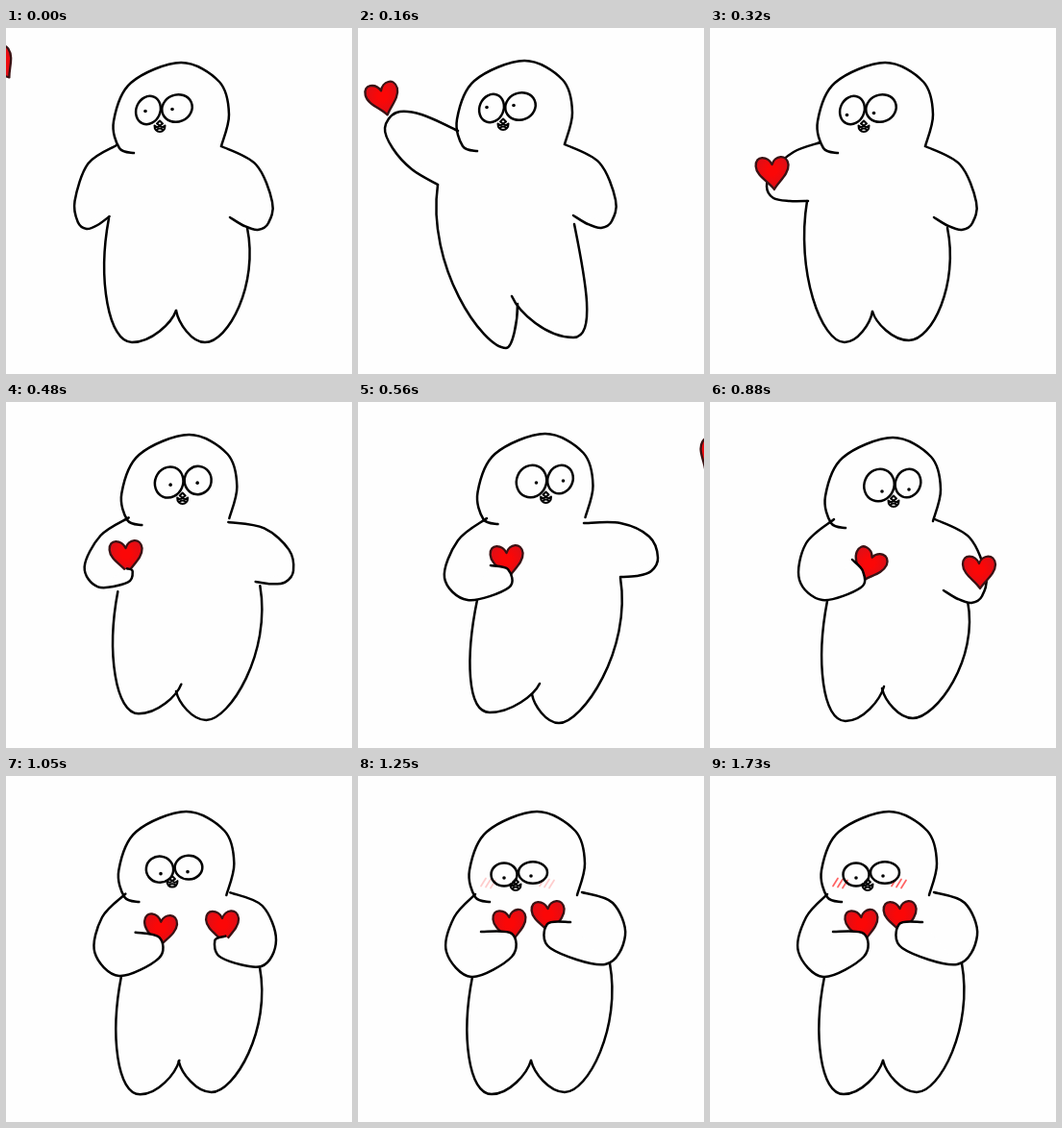
An HTML page with a canvas that plays this animation: 360 px wide and 360 px high, repeating every 2310 ms.

```html
<!DOCTYPE html>
<html lang="en">
<head>
<meta charset="utf-8">
<title>Catching hearts</title>
<style>
html, body { margin: 0; width: 100%; height: 100%; overflow: hidden; background: #fefefe; }
canvas { display: block; width: 100vw; height: 100vh; }
</style>
</head>
<body>
<canvas id="stage"></canvas>
<script>
const SIZE = 360, LOOP = 2310, PAPER = "#fefefe", INK = "#000";
const STEPS = [...Array(13).keys()].map(i => i * 80).concat(1050, 1250, 1450, 1730);
const CATCH_L = 6, CATCH_R = 13, STILL = 14; // steps where a heart slips behind the hand, and where all rests
const canvas = document.getElementById("stage");
const ctx = canvas.getContext("2d");

const mix = (a, b, f) => a.map((v, i) => v + (b[i] - v) * f);
const place = (pts, x, y, sx = 1) => pts.map((v, i) => i % 2 ? v + y : v * sx + x);
const flip = pts => place(pts, SIZE, 0, -1);

const HEAD = [133,130, 118,125, 112,97, 130,57, 182,36, 222,56, 232,90, 224,123];

// Arm curves from the shoulder, x pointing away from the body.
const ARM = {
  down: [0,0, 36,19, 53,58, 49,80, 38,87, 24,83, 9,74],
  carry: [0,0, 28,10, 50,30, 56,46, 49,58, 32,61, 13,61],
  out: [0,0, 38,0, 68,14, 77,36, 70,50, 55,55, 38,56],
  up: [0,0, 38,-17, 64,-19, 76,-3, 68,18, 48,40, 21,56],
  fold: [0,0, 30,23, 44,62, 20,85, -23,72, -22,53, -4,49],
  grip: [0,0, 29,25, 36,63, 12,84, -28,71, -30,54, -19,42],
  tuck: [0,0, 22,24, 30,60, 4,86, -38,65, -38,41, -6,39],
  hug: [0,0, 32,11, 45,45, 24,75, -33,58, -36,33, -12,31]
};

// head: dx, dy, turn, squint. leg: hip, foot, crotch. heart: x, y, angle.
const stand = {
  at: 0, head: [0,0, 0, 0], gaze: [-4,1],
  shoulderL: [115,122], armL: place(ARM.down, 0, 0, 0.82), legL: [107,198, 131,327, 177,294], heartL: [-7,38, -0.6],
  shoulderR: [224,123], armR: ARM.down, legR: [251,208, 207,327, 177,294], heartR: [470,57, 0.52]
};
const reachR = {
  at: 9, head: [26,-5, 1, 0], gaze: [2.5,0.5],
  shoulderL: [147,118], armL: ARM.fold, legL: [135,204, 136,322, 200,279], heartL: [167,166, -0.05],
  shoulderR: [256,107], armR: ARM.up, legR: [277,163, 206,333, 194,287], heartR: [334,74, 0.22]
};
const reachL = {
  ...stand, at: 2, head: [-9,-2, 0, 0], gaze: [-6,-1],
  shoulderL: flip(reachR.shoulderR), armL: ARM.up, legL: flip(reachR.legR), heartL: [26,74, -0.22],
  shoulderR: [215,121], legR: flip(reachR.legL)
};
const carryL = {
  ...stand, at: 4, gaze: [-6.5,5],
  shoulderL: [115,119], armL: ARM.carry, legL: [101,180, 140,327, 169,295], heartL: [65,151, -0.05],
  legR: [247,208, 207,325, 169,295]
};
const holdL = {
  at: 7, head: [12.5,-3, 1, 0], gaze: [4,1.5],
  shoulderL: [134,121], armL: ARM.fold, legL: [124,206, 137,323, 189,293], heartL: [155,166, -0.05],
  shoulderR: [235,126], armR: ARM.out, legR: [273,183, 209,334, 181,304], heartR: [369,57, 0.52]
};
const carryR = {
  at: 11, head: [8,1, 1, 0], gaze: [2,6.5],
  shoulderL: [129,122], armL: ARM.grip, legL: [122,207, 141,332, 181,296], heartL: [165,170, 0.42],
  shoulderR: [234,122], armR: ARM.down, legR: [268,207, 211,329, 179,298], heartR: [280,177, 0]
};
const hug = {
  at: STILL, head: [4,1, 0, 1], gaze: [-1,3.5],
  shoulderL: [122,123], armL: ARM.tuck, legL: [119,209, 139,331, 180,296], heartL: [158,156, -0.07],
  shoulderR: [233,121], armR: ARM.hug, legR: [262,195, 215,329, 180,296], heartR: [198,147, -0.05]
};
const poses = [stand, reachL, carryL, holdL, reachR, carryR, hug];

function poseAt(step) {
  const s = Math.min(step, STILL);
  const i = Math.min(poses.length - 2, poses.findLastIndex(p => p.at <= s));
  const a = poses[i], b = poses[i + 1], f = (s - a.at) / (b.at - a.at);
  const pose = {};
  for (const part in a) if (part !== "at") pose[part] = mix(a[part], b[part], f);
  return pose;
}

// Smooth curve through the points, starting at point number `from`.
function curve(pts, from = 0) {
  const last = pts.length / 2 - 1, path = new Path2D();
  const get = (i, k) => pts[2 * Math.max(0, Math.min(last, i)) + k];
  path.moveTo(get(from, 0), get(from, 1));
  for (let i = from; i < last; i++) {
    const lead = k => get(i, k) + (get(i + 1, k) - get(i - 1, k)) / 6;
    const trail = k => get(i + 1, k) - (get(i + 2, k) - get(i, k)) / 6;
    path.bezierCurveTo(lead(0), lead(1), trail(0), trail(1), get(i + 1, 0), get(i + 1, 1));
  }
  return path;
}

function leg([hx, hy, fx, fy, cx, cy], out) {
  ctx.beginPath();
  ctx.moveTo(hx, hy);
  ctx.bezierCurveTo(hx + out * 12, (hy + fy) / 2, fx + out * 24, fy, fx, fy);
  ctx.bezierCurveTo(fx + (cx - fx) * 0.4 - out * 2, fy, cx + (fx - cx) * 0.15 - out * 2, cy + (fy - cy) * 0.4, cx, cy);
  ctx.stroke();
}

function heart([x, y, angle]) {
  ctx.save();
  ctx.translate(x, y);
  ctx.rotate(angle);
  const shape = new Path2D("M0,-9C3,-18 16,-20 17,-8C17,2 6,9 1,17C-4,9 -17,2 -17,-8C-17,-20 -4,-18 0,-9Z");
  const red = ctx.createRadialGradient(0, -3, 5, 0, -3, 20);
  red.addColorStop(0, "#fb0707");
  red.addColorStop(1, "#d8101a");
  ctx.fillStyle = red;
  ctx.strokeStyle = "#3a1214";
  ctx.lineWidth = 2.3;
  ctx.fill(shape);
  ctx.stroke(shape);
  ctx.restore();
}

function arm(pts, [x, y], out, held, heartInFront) {
  const placed = place(pts, x, y, out);
  if (!heartInFront) heart(held);
  ctx.fillStyle = PAPER;
  ctx.fill(curve(placed, 3));
  ctx.stroke(curve(placed));
  if (heartInFront) heart(held);
}

function eye(x, y, rx, ry, tilt, px, py) {
  ctx.beginPath();
  ctx.ellipse(x, y, rx, ry, tilt, 0, 7);
  ctx.stroke();
  ctx.beginPath();
  ctx.arc(x + px, y + py, 1.8, 0, 7);
  ctx.fillStyle = INK;
  ctx.fill();
}

function face([dx, dy, turn, squint], [gx, gy], flush) {
  ctx.save();
  ctx.translate(163 + dx + 20 * turn, 84.5 + dy + 16 * squint);
  if (flush) blush(flush);
  const open = 1 - 0.2 * squint, tilt = 0.4 * (1 - squint);
  eye(-15, 1, 12.5 + 3 * turn + squint, (15 + 2 * turn) * open, tilt, gx + 1, gy);
  eye(15, -1, 16 - 3 * turn - squint, (14 + turn) * open, tilt * (turn * 2 - 1), gx - 1, gy);
  ctx.translate(3 * (turn - 1), 18 - 6 * squint);
  ctx.lineWidth = 2;
  ctx.stroke(new Path2D("M-3,-3L0,-6L3,-3L0,-1ZM-5.5,-1Q-3,2 0,-1Q3,2 5.5,-1C6,7.5 -6,7.5 -5.5,-1M-3,3Q0,1 3,3"));
  ctx.restore();
}

function blush(alpha) {
  ctx.save();
  ctx.globalAlpha = alpha;
  ctx.strokeStyle = "#ff4848";
  ctx.lineWidth = 1.7;
  for (const x of [-34, 27]) {
    for (let i = 0; i < 3; i++) ctx.stroke(curve([x + i * 5, 5 + i, x + i * 5 - 5, 13 + i]));
  }
  ctx.restore();
}

function draw(step) {
  const p = poseAt(step);
  ctx.setTransform(canvas.width / SIZE, 0, 0, canvas.height / SIZE, 0, 0);
  ctx.fillStyle = PAPER;
  ctx.fillRect(0, 0, SIZE, SIZE);
  ctx.strokeStyle = INK;
  ctx.lineWidth = 2.5;
  ctx.lineCap = ctx.lineJoin = "round";
  leg(p.legL, -1);
  leg(p.legR, 1);
  arm(p.armL, p.shoulderL, -1, p.heartL, step < CATCH_L);
  arm(p.armR, p.shoulderR, 1, p.heartR, step < CATCH_R);
  ctx.stroke(curve(place(HEAD, p.head[0], p.head[1])));
  face(p.head, p.gaze, Math.max(0, 0.27 + 0.29 * (step - STILL)) * (step >= STILL));
}

function resize() {
  const ratio = window.devicePixelRatio || 1;
  canvas.width = Math.round(innerWidth * ratio);
  canvas.height = Math.round(innerHeight * ratio);
}

const start = performance.now();
function tick() {
  const time = (performance.now() - start) % LOOP;
  draw(STEPS.findLastIndex(t => t <= time));
  requestAnimationFrame(tick);
}
addEventListener("resize", resize);
resize();
tick();
</script>
</body>
</html>
```
